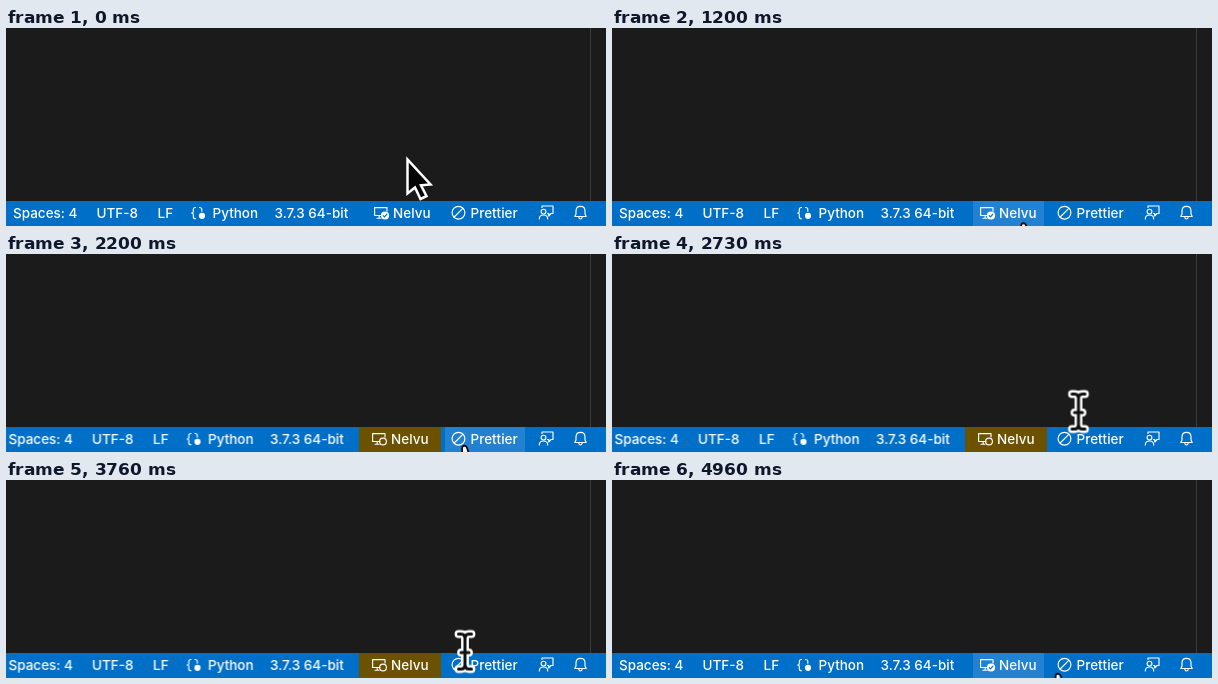
Recreate the animation shown at these times as an HTML page. Size 600 by 198 pixels, loop 5000 ms.

```html
<!DOCTYPE html>
<html lang="en">
<head>
<meta charset="utf-8">
<title>Status bar</title>
<style>
  html, body { margin: 0; width: 100%; height: 100%; overflow: hidden; background: #1b1b1b; }
  svg { display: block; width: 600px; height: 198px; }
  text { font: 500 13.5px Inter, "Open Sans", sans-serif; fill: #fff; }
  .icon { fill: none; stroke: #fff; stroke-width: 1.15; stroke-linecap: round; stroke-linejoin: round; }
  .solid { fill: #fff; stroke: none; }

  /* Status toggles: hard switches */
  .off, .on, .shift, .hover-env, .hover-fmt { animation: 5s step-end infinite; }
  .off { animation-name: off; }
  .on { animation-name: on; }
  .shift { animation-name: shift; }
  .hover-env { animation-name: hover-env; }
  .hover-fmt { animation-name: hover-fmt; }
  @keyframes off { 0%, 91.2% { opacity: 1 } 28% { opacity: 0 } 100% { opacity: 1 } }
  @keyframes on { 0%, 91.2% { opacity: 0 } 28% { opacity: 1 } 100% { opacity: 0 } }
  @keyframes shift {
    0%, 91.2%, 100% { transform: none }
    28% { transform: translateX(-4.5px) }
  }
  @keyframes hover-env { 0%, 35.6% { opacity: 0 } 10%, 84.4%, 100% { opacity: 1 } }
  @keyframes hover-fmt { 0%, 46%, 100% { opacity: 0 } 35.6% { opacity: 1 } }

  /* Pointer shapes: one group shows them, the inner one moves */
  .show { animation: 5s step-end infinite; }
  .show.arrow { animation-name: show-arrow; }
  .show.hand { animation-name: show-hand; }
  .show.beam { animation-name: show-beam; }
  @keyframes show-arrow { 0% { opacity: 1 } 8%, 100% { opacity: 0 } }
  @keyframes show-hand { 0%, 47.2% { opacity: 0 } 8%, 82%, 100% { opacity: 1 } }
  @keyframes show-beam { 0%, 82%, 100% { opacity: 0 } 47.2% { opacity: 1 } }

  .move { animation: 5s linear infinite; }
  .arrow .move { animation-name: move-arrow; }
  .hand .move { animation-name: move-hand; }
  .beam .move { animation-name: move-beam; }
  @keyframes move-arrow {
    0%, 1% { transform: translate(400px, 129px) }
    4% { transform: translate(402px, 145px) }
    8%, 100% { transform: translate(409px, 182px) }
  }
  @keyframes move-hand {
    0%, 8% { transform: translate(409px, 187px) }
    11%, 34% { transform: translate(412px, 194.5px) }
    37% { transform: translate(440px, 193px) }
    40%, 45% { transform: translate(459px, 191px) }
    47.2% { transform: translate(460px, 185px) }
    82% { transform: translate(452px, 188px) }
    86% { transform: translate(450px, 191px) }
    92%, 100% { transform: translate(446.5px, 193px) }
  }
  @keyframes move-beam {
    0%, 47.2% { transform: translate(461px, 175px) }
    49.6% { transform: translate(465px, 148px) }
    52% { transform: translate(468px, 130px) }
    53.2% { transform: translate(468px, 137px) }
    54.6% { transform: translate(466.5px, 157.5px) }
    59% { transform: translate(463px, 170px) }
    64% { transform: translate(461px, 163px) }
    74% { transform: translate(459px, 172.5px) }
    75.2% { transform: translate(459px, 171.5px) }
    79% { transform: translate(456px, 175px) }
    82%, 100% { transform: translate(452px, 184px) }
  }
</style>
</head>
<body>
<svg viewBox="0 0 600 198">
  <defs>
    <path id="ibeam" d="M-6.5 -17.5H-4Q0 -17.5 0 -13V13Q0 17.5 -4 17.5H-6.5M6.5 -17.5H4Q0 -17.5 0 -13M0 13Q0 17.5 4 17.5H6.5M-4 1H4"/>
    <path id="screen" d="M8 8.5H.6V.6H13V4M3 11.2H7M5.2 8.7V11"/>
  </defs>

  <rect width="600" height="198" fill="#1b1b1b"/>
  <rect x="584" width="1" height="173" fill="#3b3b3b"/>
  <rect y="173" width="600" height="25" fill="#006fc8"/>

  <g class="shift">
    <text x="7" y="190">Spaces: 4</text>
    <text x="90.5" y="190">UTF-8</text>
    <text x="151.5" y="190">LF</text>
    <g class="icon" transform="translate(185 179)">
      <path d="M4.5 .5Q2.3 .5 2.3 2.5V4.5Q2.3 6 .6 6Q2.3 6 2.3 7.5V9.7Q2.3 11.7 4.5 11.7M8.5 .5Q10.8 .5 10.8 2.5V4.2"/>
      <circle class="solid" cx="11" cy="8.8" r="3.1"/>
    </g>
    <text x="206.5" y="190">Python</text>
    <text x="268.5" y="190">3.7.3 64-bit</text>
  </g>

  <g class="off">
    <rect class="hover-env" x="361" y="173" width="71" height="25" fill="#2381d2"/>
    <g class="icon" transform="translate(368 179)">
      <use href="#screen"/>
      <circle class="solid" cx="11" cy="8.5" r="4.1"/>
      <path d="M9.2 8.6L10.5 9.9L12.9 7.2" stroke="#006fc8"/>
    </g>
    <text x="387" y="190">Nelvu</text>
  </g>

  <g class="on">
    <rect x="353" y="173" width="82" height="25" fill="#6b5100"/>
    <rect class="hover-env" x="353" y="173" width="82" height="25" fill="#826b2b"/>
    <g class="icon" transform="translate(366 179)">
      <use href="#screen"/>
      <circle cx="11" cy="8.5" r="3.4"/>
    </g>
    <text x="385" y="190">Nelvu</text>
  </g>

  <rect class="hover-fmt" x="439" y="173" width="80" height="25" fill="#2381d2"/>
  <g class="icon">
    <circle cx="452.5" cy="184.7" r="6.4"/>
    <path d="M448.2 189L456.8 180.4"/>
  </g>
  <text x="464.5" y="190">Prettier</text>

  <g class="icon">
    <path d="M536 179.5V178H547V185.5H545L542.7 188V185.5H541.5"/>
    <circle cx="537.5" cy="183.6" r="2.4"/>
    <path d="M533.3 191Q533.3 187 537.5 187Q541.7 187 541.7 191"/>
    <path d="M568.8 188.5L570 186V183Q570 178.3 574.5 178.3Q579 178.3 579 183V186L580.2 188.5ZM572.8 189Q573 191 574.5 191Q576 191 576.2 189"/>
  </g>

  <g class="show arrow"><g class="move">
    <path d="M1.5 2.5V36.5L9 30.5L14.5 42L20.5 39.2L15 28.3L24.5 27.5Z" fill="#050505" stroke="#fff" stroke-width="2.5"/>
  </g></g>
  <g class="show hand"><g class="move">
    <path d="M-2.3 18L-2.9 3.2Q-2.7 .8 -.6 .7Q1.4 .8 2.2 3.4L4 9L8 18Z" fill="#fff" stroke="#000" stroke-width="1.7"/>
  </g></g>
  <g class="show beam"><g class="move" fill="none" stroke-linecap="round" stroke-linejoin="round">
    <use href="#ibeam" stroke="#fff" stroke-width="7.8"/>
    <use href="#ibeam" stroke="#101010" stroke-width="3"/>
  </g></g>
</svg>
</body>
</html>
```
